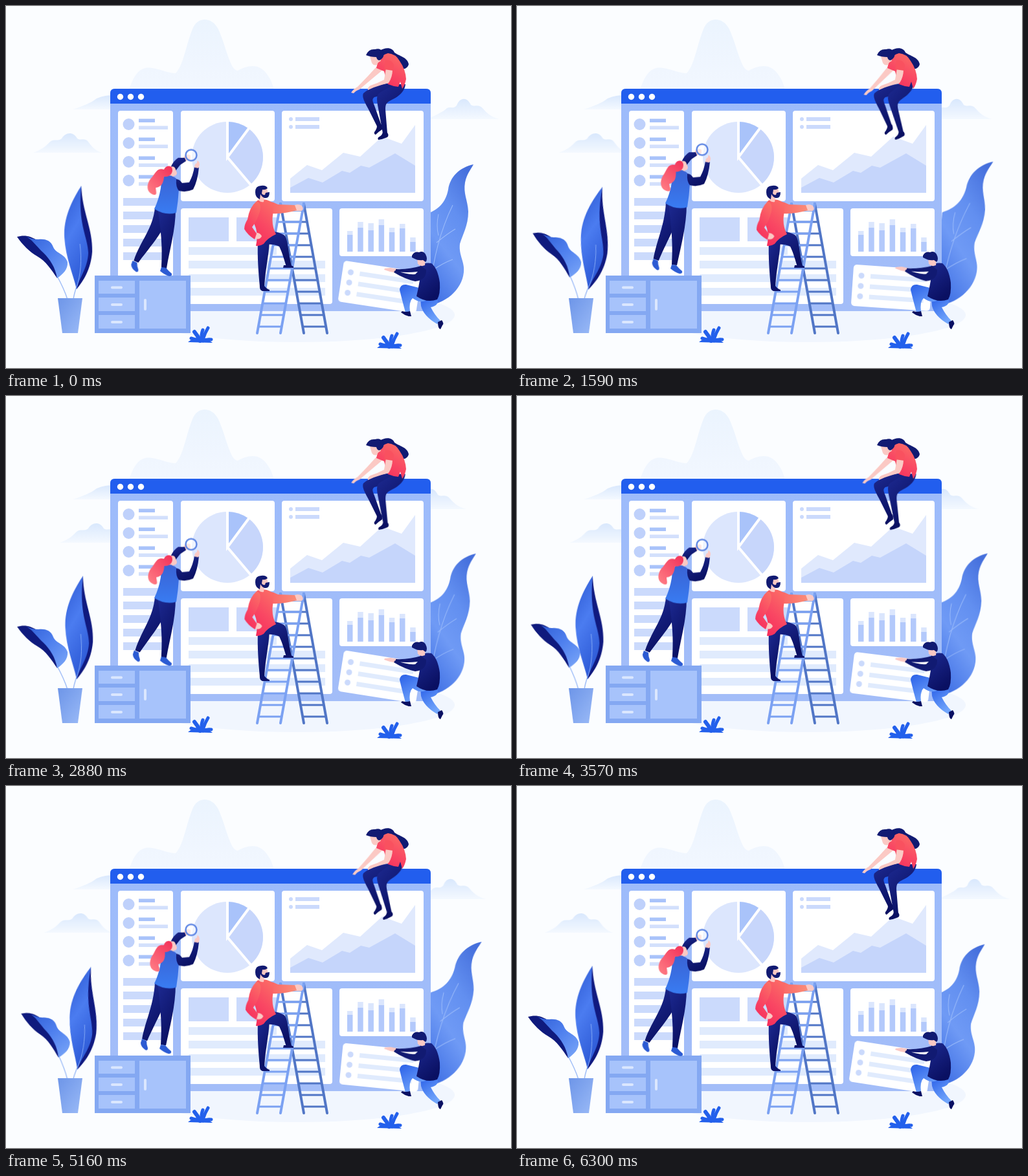
Animation of 780 by 560 pixels, one loop 6330 ms. Source, as an HTML page:

```html
<!DOCTYPE html>
<html lang="en">
<head>
<meta charset="utf-8">
<title>Dashboard team</title>
<style>
html, body { margin: 0; width: 100%; height: 100%; overflow: hidden; background: #fbfdff; }
svg { display: block; width: 780px; height: 560px; }

/* Each moving part swings from rest to --to and back, --lag of a period late. */
.sway, .morph {
  animation: sway 3165ms cubic-bezier(.37, 0, .63, 1) calc((var(--lag, 0) - 1) * 3165ms) infinite;
}
@keyframes sway { 50% { transform: var(--to); } }

.drift { animation: drift 6330ms linear infinite; }
@keyframes drift { 50% { transform: translateX(var(--dx)); } }

.monstera { transform-origin: 655px 462px; animation: monstera 3165ms infinite; }
@keyframes monstera {
  0% { transform: skewX(0deg) scaleY(1); animation-timing-function: cubic-bezier(.33, .5, .64, 1); }
  52% { transform: skewX(-3.5deg) scaleY(1.02); animation-timing-function: cubic-bezier(.36, 0, .67, .5); }
  100% { transform: skewX(0deg) scaleY(1); }
}

.broad { transform-origin: 95px 452px; animation: broad 6330ms cubic-bezier(.37, 0, .63, 1) infinite; }
@keyframes broad {
  0%, 4%, 48%, 94%, 100% { transform: rotate(0deg); }
  22% { transform: rotate(4.4deg); }
  69% { transform: rotate(7.6deg); }
}

.card { transform: rotate(9deg); transform-origin: 595px 420px; }

.legBack { animation-name: legBack; }
@keyframes legBack { 50% { d: path("M230 304 L252 308 C247 340 235 356 219 394 L211 391 C216 362 228 340 230 304Z"); } }
.legFront { animation-name: legFront; }
@keyframes legFront { 50% { d: path("M234 304 L262 306 C262 340 253 372 247 401 L239 400 C241 370 239 345 234 304Z"); } }
</style>
</head>
<body>
<svg viewBox="0 0 780 560" xmlns="http://www.w3.org/2000/svg">
<defs>
  <linearGradient id="peak" x2="0" y2="1"><stop stop-color="#ebf4fe"/><stop offset="1" stop-color="#f2f7ff"/></linearGradient>
  <linearGradient id="hill" x2="0" y2="1"><stop stop-color="#d9e8fd"/><stop offset="1" stop-color="#f4f9ff"/></linearGradient>
  <linearGradient id="win" x2="0" y2="1"><stop stop-color="#9cbbfb"/><stop offset="1" stop-color="#a3bdf8"/></linearGradient>
  <linearGradient id="big" x1=".8" y1="0" x2=".35" y2="1"><stop stop-color="#456fdc"/><stop offset=".35" stop-color="#628ff0"/><stop offset=".65" stop-color="#6f9af5"/><stop offset="1" stop-color="#4474e6"/></linearGradient>
  <linearGradient id="tall" x2=".4" y2="1"><stop stop-color="#2c58d2"/><stop offset=".5" stop-color="#4b7cf0"/><stop offset="1" stop-color="#2f5cd8"/></linearGradient>
  <linearGradient id="wide" x2="1" y2="1"><stop stop-color="#2f5dd6"/><stop offset=".5" stop-color="#4f80ee"/><stop offset="1" stop-color="#7ba7f8"/></linearGradient>
  <linearGradient id="pot" x2="1" y2="1"><stop stop-color="#6d95e8"/><stop offset="1" stop-color="#9abaf7"/></linearGradient>
  <linearGradient id="navy" x2=".5" y2="1"><stop stop-color="#1d2a92"/><stop offset="1" stop-color="#0a1062"/></linearGradient>
  <linearGradient id="red" x1=".75" y1="0" x2=".25" y2="1"><stop stop-color="#fb6d66"/><stop offset=".55" stop-color="#f94763"/><stop offset="1" stop-color="#f52e5c"/></linearGradient>
  <linearGradient id="sleeve" x2="1"><stop stop-color="#fa5f64"/><stop offset="1" stop-color="#fa8d78"/></linearGradient>
  <linearGradient id="hair" x1="1" x2="0" y2="1"><stop stop-color="#f22f58"/><stop offset="1" stop-color="#ff8086"/></linearGradient>
  <linearGradient id="vest" x2="0" y2="1"><stop stop-color="#3a62d4"/><stop offset="1" stop-color="#397cf2"/></linearGradient>
  <linearGradient id="jean" x2=".6" y2="1"><stop stop-color="#2a60e8"/><stop offset="1" stop-color="#73a7fc"/></linearGradient>
  <g id="tuft" fill="none" stroke="#2360ec" stroke-linecap="round">
    <path d="M299 518 L286 514" stroke-width="5"/>
    <path d="M300 518 Q296 510 291 504" stroke-width="6"/>
    <path d="M302 516 Q301 509 304 501" stroke-width="5"/>
    <path d="M304 516 Q307 506 312 498" stroke-width="5"/>
    <path d="M304 518 Q310 515 317 516" stroke-width="5"/>
    <path fill="#2360ec" stroke="none" d="M281 520 Q291 512 302 512 Q312 515 319 521Z"/>
  </g>
</defs>

<rect width="780" height="560" fill="#fbfdff"/>
<path fill="url(#peak)" d="M190 130 C200 98 212 94 226 96 C240 98 250 104 262 104 C274 92 278 60 288 36 C295 16 318 16 328 36 C340 62 346 100 358 100 C372 92 390 88 402 104 C410 114 412 122 414 130Z"/>
<path fill="url(#hill)" d="M103 160 C120 154 130 151 140 143 C150 139 156 138 170 138 V160Z"/>
<g class="drift" style="--dx:45px">
  <path fill="url(#hill)" d="M42 227 C56 222 62 216 68 210 C74 205 80 210 86 205 C92 195 104 194 110 205 C116 209 121 203 127 210 C132 217 137 223 148 227Z"/>
</g>
<g class="drift" style="--dx:-56px">
  <path fill="url(#hill)" d="M652 175 C664 168 674 165 681 158 C687 155 691 160 696 154 C701 141 712 140 718 153 C725 157 729 151 736 158 C743 166 748 171 762 175Z"/>
</g>
<ellipse cx="450" cy="478" rx="243" ry="42" fill="#f1f6fe"/>

<g class="monstera">
  <path fill="url(#big)" d="M722 245 C700 250 686 264 683 284 C679 304 668 316 648 322 V464 C678 461 704 440 707 412 C709 396 699 386 701 368 C705 354 714 340 714 318 C713 300 706 290 709 273 C712 259 718 253 722 245Z"/>
  <path fill="none" stroke="#9cbcfa" stroke-width="1" d="M690 308 C672 345 660 385 655 440 M668 355 Q664 340 668 322 M665 366 Q682 352 694 345 M657 410 Q674 398 690 392"/>
</g>

<rect x="161" y="128" width="495" height="344" rx="7" fill="url(#win)"/>
<path fill="#225eee" d="M161 151 V135 Q161 128 168 128 H649 Q656 128 656 135 V151Z"/>
<g fill="#fff">
  <circle cx="176.500" cy="140.500" r="4.700"/><circle cx="192.500" cy="140.500" r="4.700"/><circle cx="208.500" cy="140.500" r="4.700"/>
  <rect x="173" y="162" width="85" height="299" rx="4"/>
  <rect x="270" y="162" width="145" height="140" rx="4"/>
  <rect x="426" y="162" width="219" height="140" rx="4"/>
  <rect x="270" y="313" width="234" height="148" rx="4"/>
  <rect x="515" y="313" width="130" height="74" rx="4"/>
</g>
<g id="rows"></g>
<circle cx="342" cy="234" r="55" fill="#dce6fd"/>
<path fill="#c7d6fb" d="M342 234 L375 190 A55 55 0 0 1 378 275.500Z"/>
<path fill="#a9c3fa" d="M342 234 V179 A55 55 0 0 1 374.500 189.500Z"/>
<path fill="none" stroke="#fff" stroke-width="4" d="M342 176 V234 L376 188 M342 234 L380 279"/>
<path fill="#e0e9fd" d="M439 267 L465 246 L488 254 L521 227 L547 233 L581 202 L611 213 L632 184 V289 H439Z"/>
<path fill="#c5d5fb" d="M439 281 L467 266 L489 273 L519 255 L531 258 L548 247 L561 250 L601 228 L632 247 V289 H439Z"/>

<g class="card sway" style="--to:rotate(3.6deg);--lag:-.08">
  <rect x="519" y="405" width="122" height="64" rx="5" fill="#fff"/>
  <g id="cardRows"></g>
</g>

<g fill="none" id="ladder"></g>

<rect x="137" y="417" width="148" height="89" fill="#84a8f2"/>
<path fill="#a7c3fb" d="M143 425 H199 V445 H143Z M143 451 H199 V472 H143Z M143 478 H199 V499 H143Z M206 425 H278 V499 H206Z"/>
<path stroke="#dbe7fe" stroke-width="4" stroke-linecap="round" d="M164 435.500 H178 M164 462 H178 M164 489 H178 M215 455 V469"/>

<g class="broad">
  <path fill="none" stroke="#9fbdf7" stroke-width="1.500" d="M95 454 Q90 438 78 416"/>
  <path fill="#0f1a7d" d="M17 357 C26 370 36 380 48 387 C62 395 70 408 79 421 C88 404 70 376 50 364 C38 355 28 354 17 357Z"/>
  <path fill="url(#wide)" d="M28 355 C36 359 42 361 50 361 C60 360 69 362 73 373 C77 383 91 383 95 396 C96 407 88 415 79 421 C76 404 68 392 58 382 C47 372 40 360 28 355Z"/>
</g>
<g class="sway" style="--to:rotate(5.4deg);--lag:.05;transform-origin:104px 452px">
  <path fill="none" stroke="#9fbdf7" stroke-width="1.500" d="M104 454 Q105 446 109 434"/>
  <path fill="#101a80" d="M116 278 C117 318 134 344 133 380 C131 408 119 426 109 438 C104 400 108 318 116 278Z"/>
  <path fill="url(#tall)" d="M116 278 C104 297 88 326 90 358 C92 390 104 416 109 438 C113 420 126 406 127 382 C126 356 110 338 116 278Z"/>
  <path fill="none" stroke="#84a9f6" stroke-width="1" d="M108 438 C116 415 117 392 114 368"/>
</g>
<path fill="url(#pot)" d="M80 452 H118 L111 506 H87Z"/>

<!-- woman with the magnifier -->
<g>
  <path class="morph legBack" style="--lag:.05" fill="url(#navy)" d="M230 312 L252 316 C247 345 234 358 204 397 L197 394 C208 362 227 345 230 312Z"/>
  <path class="morph legFront" style="--lag:.05" fill="url(#navy)" d="M234 312 L262 314 C262 346 253 376 248 406 L240 406 C242 376 240 350 234 312Z"/>
  <path class="sway" style="--to:translate(16px,-3px);--lag:.05" fill="#2c5bd3" d="M195 394 L202 397 Q202 403 204 408 Q204 413 200 411 Q193 406 193 400Z"/>
  <path class="sway" style="--to:translate(-1px,-4px);--lag:.05" fill="#2c5bd3" d="M240 404 L247 405 Q252 411 256 414 Q257 418 252 418 Q245 416 238 410Z"/>
  <g class="sway" style="--to:translate(0,-9px);--lag:.05">
    <path fill="#fbc9c4" d="M274 235 Q278 228 285 231 L285 237 Q279 239 276 241Z"/>
    <path fill="url(#navy)" d="M254 250 Q259 239 266 235 L276 235 L278 240 L269 246 L262 255Z"/>
    <circle cx="286" cy="231" r="8.500" fill="#fff" fill-opacity=".55" stroke="#6289e4" stroke-width="2.500"/>
    <path fill="#fbc9c4" d="M251 250 Q260 246 262 253 L264 258 Q264 263 259 263 L258 270 H247Z"/>
    <path fill="url(#vest)" d="M245 263 Q252 260 260 265 Q267 268 267 284 Q266 302 263 320 Q246 325 229 314 Q236 300 239 282 Q240 268 245 263Z"/>
    <path fill="url(#navy)" d="M263 268 Q268 268 272 274 L283 273 Q289 262 291 249 L298 250 Q296 271 289 284 Q278 289 267 286 Q262 280 263 268Z"/>
    <path fill="#fbc9c4" d="M291 250 Q291 244 295 243 Q295 238 297 240 Q301 244 297 251Z"/>
    <g class="sway" style="--to:rotate(-9deg);--lag:.09;transform-origin:254px 255px">
      <path fill="url(#hair)" d="M257 254 C257 246 247 246 244 253 C234 250 231 258 226 264 C216 274 215 288 228 292 C234 293 231 286 231 281 C240 280 243 274 244 264 C251 265 257 261 257 254Z"/>
    </g>
  </g>
</g>

<!-- man on the ladder -->
<g>
  <path fill="url(#navy)" d="M389 362 L407 364 C406 385 401 405 399 434 L392 434 C390 412 388 390 389 362Z"/>
  <path fill="#0c136b" d="M392 432 L399 433 Q403 438 407 439 V441 H396 Q391 439 392 432Z"/>
  <path fill="url(#navy)" d="M394 362 C404 348 414 346 429 354 C436 359 435 378 441 402 L433 403 C428 387 426 380 422 372 C414 368 406 368 394 370Z"/>
  <path fill="#0c136b" d="M429 401 L440 401 L444 403 V405 H428Z"/>
  <path fill="#fbc9c4" d="M444 309 Q451 305 457 309 Q461 315 456 317 L444 317Z"/>
  <path fill="url(#sleeve)" d="M402 301 Q412 303 420 307 L446 308 L449 316 Q430 322 410 321Z"/>
  <path fill="url(#red)" d="M388 301 Q399 297 408 302 Q415 308 412 324 Q410 340 417 353 Q404 359 398 368 Q392 372 386 371 Q391 348 381 333 Q376 318 388 301Z"/>
  <g class="sway" style="--to:rotate(-2.6deg);--lag:.06;transform-origin:400px 300px">
    <path fill="#fbc9c4" d="M384 351 Q392 350 395 356 Q392 362 385 360Z"/>
    <path fill="url(#red)" d="M387 302 Q395 304 392 318 Q388 332 380 342 L387 352 L384 361 Q373 354 368 345 Q368 338 373 330 Q376 311 387 302Z"/>
  </g>
  <path fill="#fbc9c4" d="M391 283 H403 L405 289 Q405 296 399 297 L398 303 Q393 304 390 300Z"/>
  <path fill="#111a72" d="M385 288 Q385 278 394 278 Q402 277 404 282 Q400 285 396 284 L395 290 Q397 293 400 292 L401 289 Q405 288 407 288 Q407 297 401 297 Q396 297 393 291 L392 299 Q385 296 385 288Z"/>
</g>

<!-- woman seated on the window -->
<g>
  <path fill="#111a72" d="M576 70 C586 63 597 64 600 72 C608 78 620 79 622 90 C620 99 610 99 602 94 C588 92 576 84 576 70Z"/>
  <g class="sway" style="--to:rotate(-3.800deg);transform-origin:583px 97px">
    <path fill="#fbc9c4" d="M574 92 L583 98 Q566 112 546 129 Q540 131 537 135 L533 134 Q537 128 543 125 Q558 110 574 92Z"/>
  </g>
  <g class="sway" style="--to:rotate(1deg);transform-origin:560px 140px">
    <path fill="url(#navy)" d="M600 119 C580 119 562 126 552 135 C549 141 555 150 560 160 L573 186 L580 185 L569 154 C566 147 565 144 569 141 L604 132Z"/>
    <path fill="#0a1062" d="M573 185 L580 183 Q582 188 581 191 Q576 194 571 199 Q568 198 569 195 Q573 190 573 185Z"/>
  </g>
  <g class="sway" style="--to:rotate(-8.500deg);transform-origin:580px 143px">
    <path fill="#0a1062" d="M582 195 L589 196 Q592 200 589 203 Q582 206 575 207 Q573 204 577 202 Q581 200 582 195Z"/>
    <path fill="url(#navy)" d="M617 121 C602 119 588 127 575 136 C571 142 574 152 576 164 L582 197 L589 197 L586 160 C586 151 588 149 596 145 C607 140 616 132 617 121Z"/>
  </g>
  <path fill="url(#red)" d="M575 84 Q580 76 590 73 Q602 74 608 85 Q617 98 618 113 Q616 123 612 128 L609 117 L606 125 Q597 124 590 121 Q586 111 584 101 L572 96Z"/>
  <path fill="#fbc9c4" d="M587 96 L597 98 Q597 110 591 119 Q579 122 568 126 L559 130 Q558 126 563 123 Q575 119 584 114Z"/>
  <path fill="#f9515f" d="M586 84 Q595 82 599 91 L598 100 L584 98Z"/>
  <path fill="#fbc9c4" d="M562 78 L576 76 L579 85 Q574 87 573 91 Q568 93 565 88Z"/>
  <path fill="#111a72" d="M556 76 Q560 66 570 67 Q578 64 583 72 Q585 80 577 84 Q573 84 572 79 Q563 79 556 76Z"/>
</g>

<!-- crouching man -->
<g>
  <path fill="url(#jean)" d="M640 450 L666 452 Q670 463 656 466 Q662 478 671 487 L666 492 Q645 480 641 464Z"/>
  <path fill="#0a1062" d="M667 489 L673 486 Q677 491 674 494 L671 500 Q667 499 667 489Z"/>
  <path fill="url(#jean)" d="M652 453 Q642 462 628 452 Q622 457 624 473 L617 474 Q611 452 608 439 Q609 430 618 431 L642 437Z"/>
  <path fill="#0a1062" d="M612 472 Q618 474 624 472 L626 480 H622 Q615 478 610 474Z"/>
  <path fill="url(#navy)" d="M640 401 Q648 396 657 398 Q667 406 670 428 Q671 446 666 454 Q650 460 634 449 Q638 432 640 418Z"/>
  <g class="sway" style="--to:rotate(2deg);--lag:-.05;transform-origin:645px 410px">
    <path fill="#fbc9c4" d="M605 407 L594 405 L585 406 L584 408 L593 411 L605 413Z"/>
    <path fill="#111a72" d="M602 407 Q622 408 641 402 L649 408 Q650 424 632 426 Q615 422 599 412 L601 409 Q620 416 632 415 L636 411 Q620 413 602 411Z"/>
  </g>
  <path fill="#fbc9c4" d="M635 390 L648 391 L647 401 Q640 404 636 399Z"/>
  <path fill="#111a72" d="M627 386 Q631 379 638 381 Q644 378 648 384 Q652 392 648 396 L644 393 Q636 394 631 391 L627 389Z"/>
</g>

<use href="#tuft"/>
<use href="#tuft" x="292" y="9"/>
</svg>

<script>
const byId = id => document.getElementById(id);
const box = (x, y, w, h, fill) => `<rect x="${x}" y="${y}" width="${w}" height="${h}" fill="${fill}"/>`;
const dot = (x, y, r, fill) => `<circle cx="${x}" cy="${y}" r="${r}" fill="${fill}"/>`;
const repeat = (n, draw) => Array.from({ length: n }, (_, i) => draw(i)).join("");
const MID = "#a9c3fa", SOFT = "#cbdafc", PALE = "#e0ebfd";

const bars = [[348, 354], [334, 343], [336, 347], [330, 339], [343, 350], [337, 344], [358, 365]];

byId("rows").innerHTML =
  repeat(4, i => dot(189.5, 183 + i * 29, 9, "#bfd1fb")
    + box(205, 174.5 + i * 29, 25, 5.5, MID)
    + box(205, 185.5 + i * 29, 45, 5.5, "#d3e0fc"))
  + repeat(5, i => box(181, 297 + i * 21, 60, 12, SOFT))
  + repeat(2, i => dot(440, 175 + i * 12, 3, SOFT) + box(447, 172 + i * 12, 37, 6, SOFT))
  + repeat(2, i => box(282 + i * 74, 327, 62, 37, SOFT))
  + repeat(4, i => box(282, 373 + i * 21, i ? 211 : 136, 12, PALE))
  + bars.map(([cap, top], i) => {
      const x = 527 + i * 16.2;
      return box(x, cap, 8.5, top - cap, "#dbe6fd") + box(x, top, 8.5, 380 - top, "#b3c9fb");
    }).join("");

byId("cardRows").innerHTML = repeat(3, i =>
  dot(532, 421.5 + i * 16, 4.5, SOFT) + box(546, 418 + i * 16, 84, 7, PALE));

// One half of the ladder: two parallel rails leaning by dx, with rungs between.
const ladderSide = (dx, color) => {
  const rung = i => {
    const y = 316 + i * 18;
    return `M${424 + dx * (y - 306) / 200} ${y}h36`;
  };
  return `<path stroke="${color}" stroke-width="3" d="${repeat(11, rung)}"/>
    <path stroke="${color}" stroke-width="4" stroke-linecap="round"
      d="M424 306l${dx} 200M460 306l${dx} 200"/>`;
};
byId("ladder").innerHTML = ladderSide(36, "#5176c6") + ladderSide(-36, "#7ba1f2");
</script>
</body>
</html>
```
